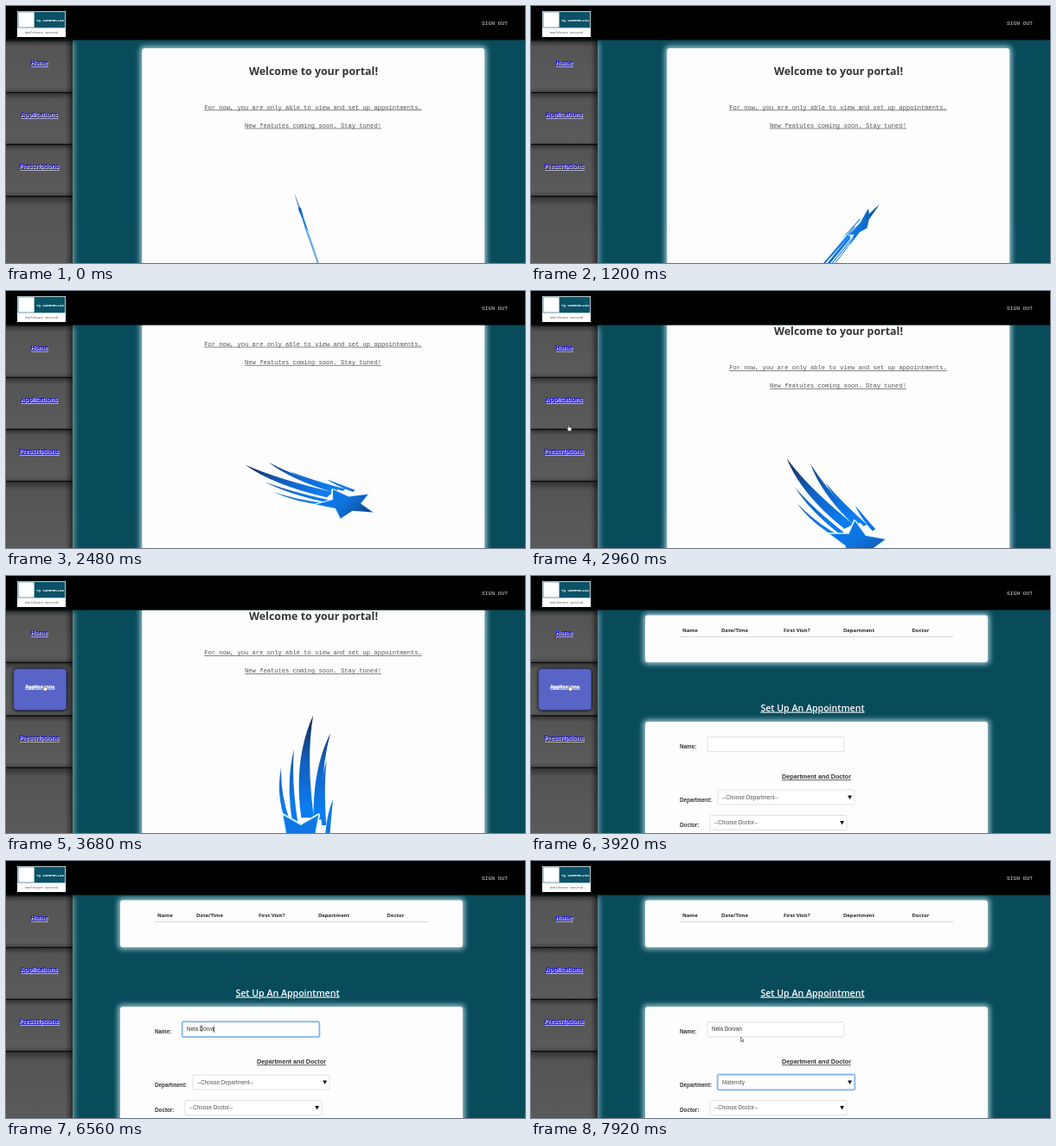
Recreate the animation shown at these times as an HTML page. Size 600 by 298 pixels, loop 8000 ms.

```html
<!DOCTYPE html>
<html lang="en">
<head>
<meta charset="utf-8">
<title>Patient portal</title>
<style>
  html, body { margin: 0; width: 100%; height: 100%; overflow: hidden; background: #084b5b; }
  svg { display: block; width: 100%; height: 100%; }
  text { white-space: pre; }
  .sans { font-family: "Liberation Sans", Arial, sans-serif; }
  .mono { font-family: "Liberation Mono", "Courier New", monospace; }
  .open { font-family: "Open Sans", "Noto Sans", sans-serif; }
  .bold { font-weight: 700; }
  .semi { font-weight: 600; }
  .mid { text-anchor: middle; }
  .line { text-decoration: underline; }
</style>
</head>
<body>
<svg id="stage" viewBox="0 0 600 298" preserveAspectRatio="none">
  <defs>
    <filter id="glow" x="-20%" y="-20%" width="140%" height="140%"><feGaussianBlur stdDeviation="3"/></filter>
    <filter id="soft" x="-20%" y="-20%" width="140%" height="140%"><feGaussianBlur stdDeviation="1.8"/></filter>
    <filter id="haze" x="-20%" y="-50%" width="140%" height="200%"><feGaussianBlur stdDeviation=".55"/></filter>
    <linearGradient id="panel" x2="0" y2="1">
      <stop offset="0" stop-color="#303030"/><stop offset=".12" stop-color="#545454"/>
      <stop offset=".9" stop-color="#5a5a5a"/><stop offset="1" stop-color="#484848"/>
    </linearGradient>
    <linearGradient id="edge">
      <stop offset="0" stop-color="#000" stop-opacity="0"/><stop offset="1" stop-color="#000" stop-opacity=".5"/>
    </linearGradient>
    <linearGradient id="comet" gradientUnits="userSpaceOnUse" x1="-84" x2="83">
      <stop offset="0" stop-color="#16294f"/><stop offset=".3" stop-color="#1260c0"/>
      <stop offset=".6" stop-color="#0c7cf0"/><stop offset=".78" stop-color="#0f72dc"/>
      <stop offset="1" stop-color="#123f80"/>
    </linearGradient>
    <clipPath id="below"><rect y="39.5" width="600" height="259"/></clipPath>
  </defs>
</svg>
<script>
const LOOP = 8000;
const stage = document.getElementById('stage');

function add(parent, tag, attrs = {}, content = '') {
  const el = document.createElementNS('http://www.w3.org/2000/svg', tag);
  for (const key in attrs) el.setAttribute(key, attrs[key]);
  el.textContent = content;
  parent.appendChild(el);
  return el;
}
const group = (parent, attrs) => add(parent, 'g', attrs);
const rect = (parent, x, y, width, height, fill, more) =>
  add(parent, 'rect', { x, y, width, height, fill, ...more });
const label = (parent, x, y, size, fill, cls, content) =>
  add(parent, 'text', { x, y, 'font-size': size, fill, class: cls }, content);
const show = (el, on) => el.setAttribute('display', on ? 'inline' : 'none');
const move = (el, x, y) => el.setAttribute('transform', `translate(${x} ${y})`);

// Interpolates rows of [time, value, value, ...].
function track(rows, t, ease = k => k) {
  if (t <= rows[0][0]) return rows[0].slice(1);
  for (let i = 1; i < rows.length; i++) {
    const [a, b] = [rows[i - 1], rows[i]];
    if (t < b[0]) {
      const k = ease((t - a[0]) / (b[0] - a[0]));
      return a.slice(1).map((v, j) => v + (b[j + 1] - v) * k);
    }
  }
  return rows[rows.length - 1].slice(1);
}
const smooth = k => k * k * (3 - 2 * k);

function card(parent, x, y, w, h) {
  rect(parent, x - 2, y - 2, w + 4, h + 4, '#d6f3f6', { rx: 4, filter: 'url(#glow)', opacity: .8 });
  rect(parent, x, y, w, h, '#fdfdfd', { rx: 3 });
}

rect(stage, 0, 0, 600, 298, '#084b5b');
const content = group(stage, { 'clip-path': 'url(#below)' });

// Welcome page
const welcome = group(content);
const sheet = group(welcome);
card(sheet, 157.3, 49, 395.9, 480);
label(sheet, 355.5, 79.7, 12.4, '#333', 'open bold mid', 'Welcome to your portal!');
label(sheet, 355, 119.5, 7.12, '#555', 'mono mid line', 'For now, you are only able to view and set up appointments.');
label(sheet, 355, 140.7, 7.12, '#555', 'mono mid line', 'New featutes coming soon. Stay tuned!');

// Comet: x runs towards the star, y towards the outer side of the tails.
const comet = group(sheet, { fill: 'url(#comet)' });
function tail(tx, ty, cx, cy, bx, by, w) {
  const h = w / 2;
  add(comet, 'path', { d: `M${tx} ${ty}Q${cx} ${cy + h} ${bx} ${by + h}V${by - h}Q${cx} ${cy - h} ${tx} ${ty}Z` });
}
tail(-84, 0, -37, 15, 24, 6, 14);
tail(-65, -19, -28, -4, 26, -5, 9);
tail(-48, 21, -15, 27, 28, 20, 6);
tail(-30, 35, 0, 39, 30, 27, 5);
tail(-37, -15, -10, -9, 32, -12, 5);
tail(5, -22, 18, -18, 42, -16, 5);
const star = Array.from({ length: 10 }, (_, i) => {
  const a = i * 36 * Math.PI / 180, r = i % 2 ? 16 : 33;
  return [48 + r * Math.cos(a), 13.5 + r * Math.sin(a)].map(v => v.toFixed(1)).join();
}).join(' ');
add(comet, 'polygon', { points: star, stroke: '#d9f6fc', 'stroke-width': 3.5, 'stroke-linejoin': 'round' });
add(comet, 'polygon', { points: star });

// Appointment page
const form = group(content);
card(form, 132, 45.5, 396, 54.5);
[[175, 'Name'], [220, 'Date/Time'], [292, 'First Visit?'], [361, 'Department'], [440.5, 'Doctor']]
  .forEach(([x, s]) => label(form, x, 64.5, 5.9, '#222', 'open bold', s));
rect(form, 172, 70, 316, .8, '#cfcfcf');
label(form, 325.5, 156.6, 10.6, '#fff', 'open semi mid line', 'Set Up An Appointment');
card(form, 132, 169, 396, 200);
label(form, 330, 235, 7.2, '#333', 'sans bold mid line', 'Department and Doctor');

function field(x, y, name, baseline, arrow) {
  label(form, 172, baseline, 6.3, '#333', 'sans bold', name);
  const ring = rect(form, x - .7, y - .7, 159.4, 18.4, 'none', { rx: 2, stroke: '#a9cdf6', 'stroke-width': 1.4 });
  const box = rect(form, x, y, 158, 17, '#fff', { rx: 1.2, 'stroke-width': .8 });
  if (arrow) add(form, 'path', { d: `M${x + 150.2} ${y + 6.4}h4.8l-2.4 4.6z`, fill: '#111' });
  const value = label(form, x + 5, y + 10.7, 6.3, arrow ? '#555' : '#333', 'sans', '');
  const focus = on => {
    show(ring, on);
    box.setAttribute('stroke', on ? '#4f94e6' : '#d9d9d9');
  };
  focus(false);
  return { value, focus };
}
const nameField = field(204, 186.7, 'Name:', 200);
const deptField = field(216, 248, 'Department:', 261.8, true);
const docField = field(207, 277.5, 'Doctor:', 291, true);
docField.value.textContent = '--Choose Doctor--';
const caret = rect(form, 0, 191.2, .7, 7.6, '#222');

// Sidebar
const side = group(stage, { 'clip-path': 'url(#below)' });
rect(side, -10, 42, 89, 270, '#b5d5da', { filter: 'url(#glow)', opacity: .65 });
rect(side, 0, 39.5, 77, 259, '#585858');
function item(y, h) {
  const g = group(side);
  rect(g, 0, y, 77, h, 'url(#panel)');
  rect(g, 69, y, 8, h, 'url(#edge)');
  rect(g, 0, y - .6, 77, 1.3, '#080808');
  return g;
}
function link(g, y, s) {
  const a = group(g);
  label(a, 39, y + .9, 7.2, '#f0f0fa', 'sans bold mid line', s).setAttribute('filter', 'url(#haze)');
  label(a, 38.2, y, 7.2, '#1308e8', 'sans bold mid line', s);
  return a;
}
link(item(40, 60), 68, 'Home');
const apps = item(100.3, 63);
const appsLink = link(apps, 128.4, 'Applications');
const hover = group(apps);
rect(hover, 8, 107, 63, 50, '#151515', { rx: 5, filter: 'url(#soft)' });
rect(hover, 8.8, 107.7, 61, 47.6, '#5965c6', { rx: 3.5, stroke: '#343d8c', 'stroke-width': .6 });
label(hover, 39.6, 131, 5.7, '#e8e8f8', 'sans bold mid line', 'Applications').setAttribute('filter', 'url(#haze)');
label(hover, 39, 130.2, 5.7, '#fff', 'sans bold mid line', 'Applications');
const lower = group(side);
const prescriptions = item(160.4, 60);
link(prescriptions, 188.4, 'Prescriptions');
lower.append(prescriptions, item(220.6, 90));

// Header
rect(stage, 0, 0, 600, 39.5, '#000');
rect(stage, 13, 6, 56, 30, '#fff');
rect(stage, 13.7, 6.7, 54.6, 18.6, '#0b5266');
rect(stage, 14.4, 7.3, 18.2, 17.4, '#fff');
label(stage, 51, 18, 4.1, '#fff', 'mono bold mid', 'TQ CAREMELLOW');
label(stage, 41, 31.8, 3.5, '#444', 'mono mid', 'Healthcare Secured');
label(stage, 550, 22, 6.25, '#e0e0e0', 'mono', 'SIGN OUT');

// Pointers
const pointer = group(stage);
const ink = { fill: '#fff', stroke: '#111', 'stroke-width': .5, 'stroke-linejoin': 'round' };
const shapes = {
  hand: add(pointer, 'path', { d: 'M-1.2-3.3q.6-.8 1.1 0v2l2.4.6q.9.3.7 1.3l-.6 2.8h-3.1l-2-3q0-.9.8-.5l.7.5z', ...ink }),
  beam: add(pointer, 'path', { d: 'M-1.1-3h2.2M0-3v6M-1.1 3h2.2', fill: 'none', stroke: '#222', 'stroke-width': .6 }),
  arrow: add(pointer, 'path', { d: 'M-.5-3v5.3l1.2-1.1.9 2 .9-.4-.9-1.9h1.6z', ...ink })
};

const scrollRows = [[1440, 0], [1520, 28], [1600, 56], [1720, 84], [2360, 84], [2480, 56], [2620, 28.5]];
// time, direction in degrees, scale along, scale across, shear
const cometRows = [[0, -109, .85, .05, 0], [1920, -14.5, .96, .31, -.46], [2960, 45, 1, .8, -.25],
  [3680, 90, 1.1, 1.05, 0], [4000, 110, 1.12, 1.05, .1]];
const pointerRows = [[2640, 120, 205], [2960, 44, 159], [3200, 44, 156], [3440, 45, 130], [3960, 45, 130],
  [4320, 225, 195], [4560, 226, 194], [6800, 226, 194], [7120, 300, 257], [7600, 290, 257], [7900, 243, 207]];
const person = 'Nela Dorvan';
const keyTimes = [4900, 5600, 5640, 5680, 5840, 6080, 6240, 6320, 6400, 6480, 6640];
const focusTime = 4700, deptTime = 7040;

function draw(t) {
  const onForm = t >= 3900;
  show(welcome, !onForm);
  show(form, onForm);

  const [scroll] = track(scrollRows, t);
  move(sheet, 0, -scroll);
  const [angle, along, across, shear] = track(cometRows, t);
  comet.setAttribute('transform',
    `translate(355 282.3) rotate(${angle}) matrix(${along} 0 ${shear} ${across} 0 0)`);

  const [lift] = track([[3200, 0], [3400, 1], [4080, 1], [4200, 0]], t);
  hover.setAttribute('opacity', lift);
  appsLink.setAttribute('opacity', 1 - lift);
  move(lower, 0, 1.6 * lift);

  const typed = keyTimes.filter(k => k <= t).length;
  const nameOn = t >= focusTime && t < deptTime;
  nameField.value.textContent = person.slice(0, typed);
  nameField.focus(nameOn);
  const lastKey = typed ? keyTimes[typed - 1] : focusTime;
  show(caret, nameOn && (t - lastKey) % 1060 < 530);
  if (nameOn) {
    const end = typed ? nameField.value.getSubStringLength(0, typed) : 0;
    caret.setAttribute('x', 208.8 + end);
  }
  deptField.focus(t >= deptTime);
  deptField.value.textContent = t < 7600 ? '--Choose Department--' : 'Maternity';

  const [px, py] = track(pointerRows, t, smooth);
  show(pointer, t >= 2640);
  move(pointer, px, py);
  const kind = t > 2860 && t < 4060 ? 'hand' : t > 4240 && t < 6900 ? 'beam' : 'arrow';
  for (const key in shapes) show(shapes[key], key === kind);
}

const start = performance.now();
function tick() {
  draw((performance.now() - start) % LOOP);
  requestAnimationFrame(tick);
}
tick();
</script>
</body>
</html>
```
